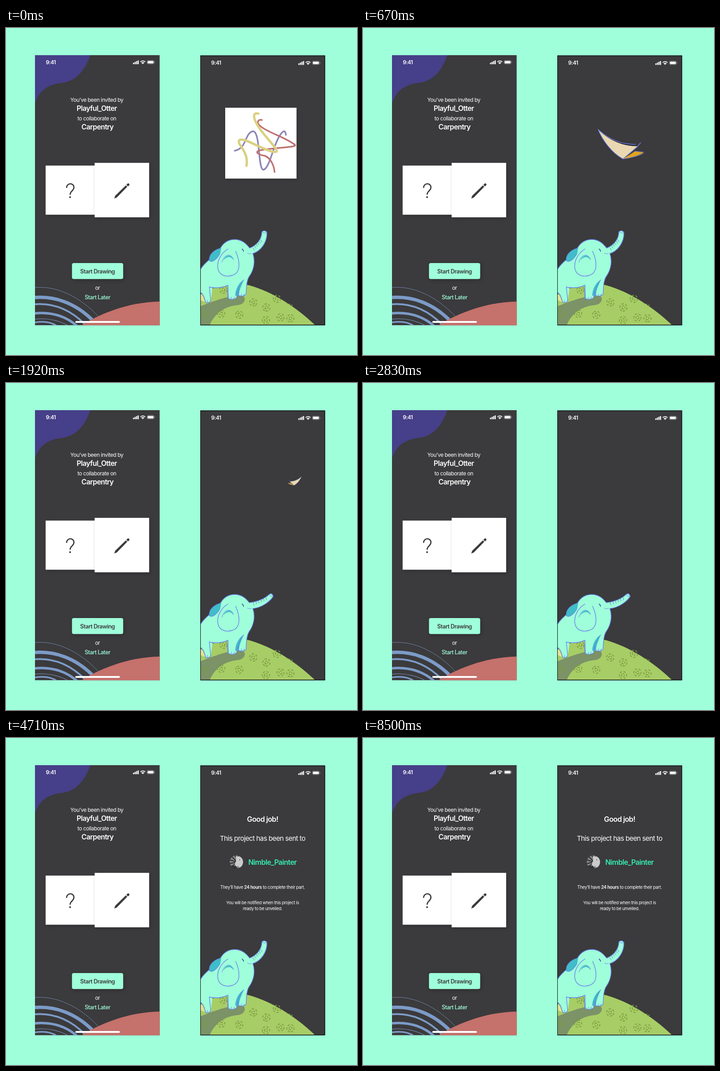
Animation, 775 px wide and 722 px high, one loop 9 s. Source, as an HTML page with a canvas:

```html
<!DOCTYPE html>
<html lang="en">
<head>
<meta charset="utf-8">
<title>Drawing handoff</title>
<style>
html, body { margin: 0; width: 100%; height: 100%; overflow: hidden; background: #9fffda; }
canvas { display: block; }
</style>
</head>
<body>
<canvas id="stage" width="775" height="722"></canvas>
<script>
const ctx = document.getElementById('stage').getContext('2d');
const LOOP = 9000;
const MINT = '#9fffda', DARK = '#3b3a3c', BLUE = '#6a82ec', TEAL = '#3fbdc8';

const clamp = v => Math.max(0, Math.min(1, v));
const mix = (a, b, k) => a + (b - a) * k;
const smooth = k => k * k * (3 - 2 * k);
const span = (t, from, to) => smooth(clamp((t - from) / (to - from)));

function fill(d, color) {
  ctx.fillStyle = color;
  ctx.fill(new Path2D(d));
}

function stroke(d, color, width) {
  ctx.strokeStyle = color;
  ctx.lineWidth = width;
  ctx.stroke(new Path2D(d));
}

function rect(x, y, w, h, color, radius = 0) {
  ctx.fillStyle = color;
  ctx.beginPath();
  ctx.roundRect(x, y, w, h, radius);
  ctx.fill();
}

function disc(x, y, r, color) {
  ctx.fillStyle = color;
  ctx.beginPath();
  ctx.arc(x, y, r, 0, Math.PI * 2);
  ctx.fill();
}

function group(draw) {
  ctx.save();
  draw();
  ctx.restore();
}

function shadow(blur, dx, dy, alpha) {
  ctx.shadowColor = `rgba(0,0,0,${alpha})`;
  ctx.shadowBlur = blur;
  ctx.shadowOffsetX = dx;
  ctx.shadowOffsetY = dy;
}

function setFont(size, weight) {
  ctx.font = `${weight} ${size}px Inter, "Open Sans", sans-serif`;
  ctx.letterSpacing = `${-0.04 * size}px`;
}

function text(str, x, y, size, weight = 400, color = '#fff', align = 'center') {
  setFont(size, weight);
  ctx.fillStyle = color;
  ctx.textAlign = align;
  ctx.fillText(str, x, y);
}

// A centred line made of [string, weight] runs.
function richText(runs, x, y, size) {
  const widths = runs.map(([str, weight]) => {
    setFont(size, weight);
    return ctx.measureText(str).width;
  });
  let left = x - widths.reduce((a, b) => a + b) / 2;
  runs.forEach(([str, weight], i) => {
    text(str, left, y, size, weight, '#fff', 'left');
    left += widths[i];
  });
}

function statusBar(dx, dy) {
  group(() => {
    ctx.translate(dx, dy);
    text('9:41', 88, 79.5, 11.8, 600, '#fff', 'left');
    for (let i = 0; i < 4; i++) {
      const h = 3.5 + i * 1.7;
      rect(280.5 + i * 3.4, 80 - h, 2.4, h, '#fff', 0.6);
    }
    ctx.lineCap = 'butt';
    for (const r of [3.9, 7.3]) {
      ctx.beginPath();
      ctx.arc(302, 80, r, -Math.PI * 0.76, -Math.PI * 0.24);
      ctx.strokeStyle = '#fff';
      ctx.lineWidth = 1.8;
      ctx.stroke();
    }
    fill('M302,80 L300,77.8 Q302,76.4 304,77.8Z', '#fff');
    ctx.strokeStyle = 'rgba(255,255,255,.45)';
    ctx.lineWidth = 0.8;
    ctx.beginPath();
    ctx.roundRect(311.5, 71.5, 15.5, 8, 2.3);
    ctx.stroke();
    rect(312.7, 72.7, 13, 5.6, '#fff', 1.4);
    rect(327.8, 74, 1, 3, 'rgba(255,255,255,.5)', 0.5);
  });
}

function invitePhone() {
  group(() => {
    ctx.beginPath();
    ctx.rect(64, 60, 275.5, 596.5);
    ctx.clip();
    ctx.fillStyle = DARK;
    ctx.fill();
    fill('M64,60H186C175,93 155,117 125,121C94,124 74,137 64,166Z', '#463f89');

    const wave = '#7c9bc8';
    stroke('M64,573C108,569 160,589 207,640', wave, 0.8);
    stroke('M64,595C108,592 152,607 190,644', wave, 7.5);
    stroke('M64,610C105,607 142,622 174,654', wave, 4);
    stroke('M64,630C98,627 130,634 158,659', wave, 5.5);
    stroke('M64,643C94,639 124,648 142,660', wave, 1.2);
    stroke('M64,650C84,647 102,650 114,659', wave, 3.5);
    fill('M166,657C200,635 265,605 340,604V657Z', '#c5716c');
    rect(153, 647, 98.5, 4, '#fff', 2);

    group(() => {
      shadow(8, 2, 3, 0.2);
      rect(87.5, 303.7, 108.5, 108.6, '#fff');
      rect(195.7, 297.7, 120.4, 120.4, '#fff');
      rect(145.7, 519, 113, 35.2, MINT, 4);
    });
  });

  statusBar(0, 0);
  text('You’ve been invited by', 200.5, 162.5, 11.9);
  text('Playful_Otter', 200.5, 183, 15.6, 600);
  text('to collaborate on', 200.5, 203.5, 11.8);
  text('Carpentry', 202, 224, 15.6, 600);
  text('Start Drawing', 202, 541.5, 12.5, 600, DARK);
  text('or', 202, 578, 11.9);
  text('Start Later', 202, 598.5, 12.4, 500, MINT);

  ctx.lineCap = 'butt';
  stroke('M133.8,353C133.8,341.3 150,341.3 150,351.8C150,360 141.6,359.5 141.6,368', DARK, 2.6);
  disc(141.5, 373.6, 2, DARK);
  fill('M239,376.5L241,370.6L264.6,347.4L267.8,350.6L244.6,374.2Z', DARK);
  fill('M265.8,346.2L268.4,343.6Q270,342.2 271.4,343.6L272,344.2Q273.4,345.8 272,347.3L269.2,349.8Z', DARK);
}

const flowers = [
  [480, 578], [546, 606], [575, 617], [598, 598], [515, 633], [487, 646],
  [545, 639], [606, 639], [628, 641], [574, 645], [437, 632], [475, 631]
];

function hill() {
  fill('M430,588C462,568 505,560 537,568C590,583 640,616 682.5,656H430Z', '#a7cd66');
  fill('M430,614C468,599 500,589 520,590C533,594 528,611 510,612C480,615 459,633 450,656H430Z', '#7c9267');
  group(() => {
    ctx.strokeStyle = '#7a9c40';
    ctx.lineWidth = 1.8;
    ctx.lineCap = 'butt';
    flowers.forEach(([x, y], i) => {
      ctx.setLineDash([5, 3.6]);
      ctx.beginPath();
      ctx.arc(x, y, 8, i, i + Math.PI * 2);
      ctx.stroke();
      ctx.setLineDash([4, 2.2]);
      ctx.beginPath();
      ctx.arc(x, y, 3.4, i, i + Math.PI * 2);
      ctx.stroke();
    });
    ctx.setLineDash([3, 3]);
    stroke('M619,607L634,613', '#7a9c40', 1.8);
  });
}

function trunk(reach) {
  const p = (x0, y0, x1, y1) => `${mix(x0, x1, reach)},${mix(y0, y1, reach)}`;
  const root = p(538, 486, 538, 485);
  const tip = p(565, 450, 581, 467), lip = p(576, 451, 590, 471);
  const upper = `C${p(551, 481, 553, 483)} ${p(565, 468, 570, 477)} ${tip}`;
  const mouth = `Q${p(571, 445, 587, 462)} ${lip}`;
  const lower = `C${p(577, 473, 584, 481)} ${p(563, 492, 566, 496)} 545,498`;
  fill(`M534,487L${root}${upper}${mouth}${lower}L532,500Z`, MINT);
  stroke(`M${root}${upper}${mouth}${lower}`, BLUE, 1.5);
  stroke(`M${tip}Q${p(571, 455, 583, 472)} ${lip}`, BLUE, 1);
  for (let i = 0; i < 6; i++) {
    const k = i / 5;
    const x = mix(mix(545, 562, k), mix(546, 574, k), reach);
    const y = mix(485 - 18 * k - 4 * k * (1 - k), 484 - 11 * k, reach);
    const lean = mix(3.5, 1.5, reach);
    stroke(`M${x},${y}l${lean},${mix(5.5, 6.5, reach)}`, '#4c62ad', 0.8);
  }
}

function elephant(reach) {
  ctx.lineCap = ctx.lineJoin = 'round';
  fill('M430,560H458L452,602Q447,607 441,606C439,596 436,589 430,585Z', MINT);
  fill('M430,588C436,590 437,600 440,605L430,601Z', '#e8e296');
  const body = 'M430,532C437,521 446,514 453,508C462,502 465,491 474,485'
    + 'C482,472 493,467 505,467C521,467 530,476 538,486L545,498'
    + 'C551,515 547,534 538,547C530,558 531,576 530,588Q524,594 514,591L512,580'
    + 'L509,596Q500,602 491,597L490,568C477,574 464,575 449,572';
  fill(body + 'L430,578Z', MINT);
  fill('M525,556C515,562 507,574 506,591L514,591C515,578 520,568 525,556Z', TEAL);
  stroke(body, BLUE, 1.4);
  stroke('M430,584C437,588 438,598 441,606Q449,608 452,602L449,572', BLUE, 1.4);
  stroke('M490,597L488,576M497,598l1,-4M503,598l1,-4M519,591l1,-4M525,591l1,-4M444,605l1,-4', BLUE, 1);
  stroke('M512,581C515,570 519,562 525,556', BLUE, 1.1);
  fill('M475,486C459,489 447,501 449,514C457,519 467,508 473,498Z', TEAL);
  stroke('M475,486C459,489 447,501 449,514C457,519 467,508 472,499', BLUE, 1.2);

  stroke('M490,488C473,498 465,517 468,532C472,548 488,550 500,546C519,540 517,515 507,493', BLUE, 1.4);
  fill('M480,513C484,500 499,498 503,513C497,504 488,503 480,513Z', TEAL);
  stroke('M477,517C481,499 497,496 502,511', BLUE, 1);
  trunk(reach);
  stroke('M521.5,488Q524,490 524.5,493', '#4756a8', 1.8);
  stroke('M533,497Q537,500 542,498', BLUE, 0.9);
}

function scribble() {
  ctx.lineCap = ctx.lineJoin = 'round';
  stroke('M505,271C532,266 527,232 545,228C562,227 556,312 568,313C581,312 590,261 603,240C611,226 617,224 618,236', '#8d84b8', 3.5);
  stroke('M565,203C556,201 552,209 562,217C580,232 615,240 638,258C643,264 598,263 561,270C547,274 558,280 571,282C585,287 592,305 593,318', '#bf7071', 3.5);
  stroke('M557,189C545,186 545,197 555,214C570,240 602,267 597,273C588,278 545,254 531,249C518,244 510,246 516,257C528,274 534,286 531,304', '#d9d182', 5.2);
}

function sheet(t) {
  if (t > 640) return;
  const k = span(t, 60, 580);
  const p = (x0, y0, x1, y1) => `${mix(x0, x1, k)},${mix(y0, y1, k)}`;
  const tone = [232, 214, 174].map(v => mix(255, v, k));
  const shape = `M${p(484, 176, 519, 224)}Q${p(562, 176, 552, 257)} ${p(641.5, 176, 606, 261)}`
    + `L${p(641.5, 332.5, 600, 268)}L${p(484, 332.5, 574, 289)}Q${p(484, 254, 542, 266)} ${p(484, 176, 519, 224)}Z`;
  group(() => {
    ctx.globalAlpha = 1 - span(t, 520, 640);
    group(() => {
      shadow(5, 1, 2, 0.25);
      fill(shape, `rgb(${tone})`);
    });
    group(() => {
      ctx.globalAlpha *= 1 - span(t, 40, 300);
      ctx.translate(mix(484, 519, k), mix(176, 224, k));
      ctx.scale(mix(1, 0.5, k), mix(1, 0.4, k));
      ctx.translate(-484, -176);
      scribble();
    });
    ctx.globalAlpha *= k;
    stroke(shape, BLUE, 1.2);
  });
}

function bird(t) {
  if (t < 460 || t > 2760) return;
  // Pivot is the fold at the bottom; the bird turns as it flies away.
  const out = span(t, 670, 1920);
  const leave = clamp((t - 1920) / 830);
  const x = t < 1920 ? mix(574, 636, out) + 22 * Math.sin(out * Math.PI) : mix(636, 713, leave);
  const y = t < 1920 ? mix(289, 226, out) : mix(226, 168, leave);
  const size = t < 1920 ? mix(1, 0.3, out) : mix(0.3, 0.2, leave);
  const turn = mix(1, -1, span(t, 950, 1500));
  const flap = t < 670 ? 1 : 0.72 + 0.28 * Math.cos((t - 670) / 1250 * Math.PI * 6);
  group(() => {
    ctx.globalAlpha = span(t, 460, 630);
    ctx.translate(x, y);
    ctx.scale(size * turn, size * flap);
    ctx.lineCap = ctx.lineJoin = 'round';
    fill('M0,0L27,-17L46,-14Q26,-3 0,0Z', '#dfa321');
    fill('M-55,-65C-26,-40 5,-33 26,-33L31,-28L25,-27C0,-28 -35,-46 -55,-65Z', '#29282c');
    fill('M-54,-64C-30,-40 0,-28 32,-28L0,0C-24,-13 -44,-39 -54,-64Z', '#e9d8b1');
    stroke('M-55,-65C-28,-40 0,-32 28,-32M-55,-65C-44,-39 -24,-13 0,0L31,-26L39,-36', BLUE, 1.4);
    stroke('M0,0Q26,-3 45,-12M26,-17L46,-15', BLUE, 1.1);
  });
}

function avatar() {
  group(() => {
    ctx.beginPath();
    ctx.arc(508.7, 273.7, 14.7, 0, Math.PI * 2);
    ctx.clip();
    ctx.fillStyle = '#858585';
    ctx.fill();
    for (let i = 0; i < 7; i++) {
      const a = Math.PI * (0.64 + i * 0.15);
      stroke(`M511,274L${511 + 22 * Math.cos(a)},${274 + 22 * Math.sin(a)}`, '#2c2b2d', 2.2);
    }
    fill('M507,262C517,259 525,267 524,277C522,287 516,288 513,283C505,284 503,279 508,272Z', '#cbcbcb');
    fill('M496,282Q506,280 513,289H498Z', '#303030');
    disc(516, 269, 1, '#333');
  });
}

const message = [
  () => text('Good job!', 566.5, 185, 16, 600),
  () => text('This project has been sent to', 566.5, 227, 15.05),
  () => {
    avatar();
    text('Nimble_Painter', 535, 279.5, 15.8, 600, '#36efb4', 'left');
  },
  () => richText([['They’ll have ', 400], ['24 hours', 600], [' to complete their part.', 400]], 566.5, 332.5, 9.75),
  () => {
    text('You will be notified when this project is', 566.5, 367, 9.6);
    text('ready to be unveiled.', 566.5, 380, 9.6);
  }
];

function sentPhone(t) {
  rect(429, 60.5, 275.7, 596, '#09090a');
  group(() => {
    ctx.beginPath();
    ctx.rect(430, 62, 273.5, 593);
    ctx.clip();
    ctx.fillStyle = DARK;
    ctx.fill();
    hill();
    elephant(span(t, 1000, 1750) - span(t, 3350, 4150));
    sheet(t);
    bird(t);
    message.forEach((line, i) => group(() => {
      const start = 2870 + i * 120;
      ctx.globalAlpha = span(t, start, start + 450);
      line();
    }));
  });
  statusBar(365, 1.5);
}

function frame(now) {
  const t = now % LOOP;
  rect(0, 0, 775, 722, MINT);
  ctx.lineCap = 'butt';
  invitePhone();
  sentPhone(t);
  requestAnimationFrame(() => frame(performance.now() - began));
}

const began = performance.now();
frame(0);
</script>
</body>
</html>
```
